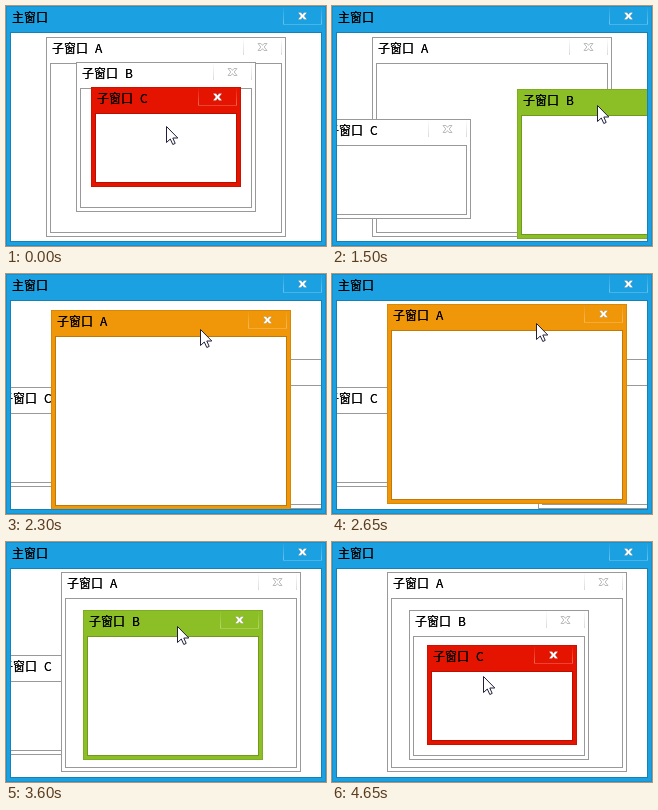
Write an HTML page with a canvas that moves like this. It is 320 px wide and 240 px high and loops after 4700 ms.

```html
<!DOCTYPE html>
<html lang="zh">
<head>
<meta charset="utf-8">
<style>
html, body { margin: 0; width: 100%; height: 100%; overflow: hidden; background: #fff; }
canvas { display: block; }
</style>
</head>
<body>
<canvas id="stage" width="320" height="240"></canvas>
<script>
const ctx = document.getElementById('stage').getContext('2d');
const LOOP = 4700, STEP = 50, SAG = 6;
const pointerStart = [160, 120], pointerEnd = [151, 134];

const windows = {
  A: { home: [40, 31], w: 240, h: 200, color: '#f09609' },
  B: { home: [70, 56], w: 180, h: 150, color: '#8cbf26' },
  C: { home: [85, 81], w: 150, h: 100, color: '#e51400' }
};

// Each drag raises its window and carries it, held at the grab point, to its goal
const drags = [
  { name: 'C', start: 650, end: 1050, grab: [74, 16], goal: [-11, 113] },
  { name: 'B', start: 1200, end: 1600, grab: [80, 16], goal: [206, 85] },
  { name: 'A', start: 2100, end: 2650, grab: [149, 19], goal: [55, 30] },
  { name: 'B', start: 3400, end: 3600, grab: [94, 16], goal: [77, 68] },
  { name: 'C', start: 4100, end: 4250, grab: [36, 16], goal: [95, 103] }
];

function ease(start, end, t) {
  const u = Math.min(Math.max((t - start) / (end - start), 0), 1);
  return u * u * (3 - 2 * u);
}

const add = (a, b) => [a[0] + b[0], a[1] + b[1]];
const mix = (a, b, k) => a.map((v, i) => Math.round(v + (b[i] - v) * k));

function sceneAt(t) {
  const places = {};
  for (const name in windows) places[name] = windows[name].home;
  let order = 'ABC', pointer = pointerStart, free = 500, losingFocus = '';
  for (const { name, start, end, grab, goal } of drags) {
    const glide = ease(Math.max(free, start - 600), start - 100, t);
    pointer = mix(pointer, add(places[name], grab), glide);
    if (t < start) break;
    // The window that loses focus gets its border one step late
    losingFocus = t < start + STEP ? order.at(-1) : '';
    order = order.replace(name, '') + name;
    const k = ease(start, end, t);
    const sag = Math.round(SAG * Math.sin(Math.PI * k));
    places[name] = add(mix(places[name], goal, k), [0, sag]);
    pointer = add(places[name], grab);
    free = end;
  }
  pointer = mix(pointer, pointerEnd, ease(LOOP - 2 * STEP, LOOP - STEP, t));
  return { places, order, pointer, losingFocus };
}

function fill(color, x, y, w, h) {
  ctx.fillStyle = color;
  ctx.fillRect(x, y, w, h);
}

function outline(color, x, y, w, h) {
  ctx.strokeStyle = color;
  ctx.lineWidth = 1;
  ctx.strokeRect(x + .5, y + .5, w - 1, h - 1);
}

function drawShape(path, x, y, stroke) {
  ctx.save();
  ctx.translate(x, y);
  ctx.fillStyle = '#fff';
  ctx.fill(path);
  ctx.strokeStyle = stroke;
  ctx.lineWidth = 1;
  ctx.stroke(path);
  ctx.restore();
}

const cross = new Path2D('M-4.5-3.5h3L0-1.6 1.5-3.5h3L1.7 0 4.5 3.5h-3L0 1.6-1.5 3.5h-3L-1.7 0Z');
const arrow = new Path2D('M.5 .5V16.5L4.3 13L6.8 18.5L9.2 17.4L6.8 12H11.8Z');

function closeButton(x, y, active) {
  const tone = active ? '255,255,255' : '150,150,150';
  const fade = ctx.createLinearGradient(0, y, 0, y + 18);
  fade.addColorStop(0, `rgba(${tone},0)`);
  fade.addColorStop(1, `rgba(${tone},.35)`);
  fill(fade, x, y + 1, 1, 17);
  fill(fade, x + 38, y + 1, 1, 17);
  if (active) fill(`rgba(${tone},.2)`, x, y + 18, 39, 1);
  drawShape(cross, x + 19.5, y + 10, active ? 'rgba(0,0,0,.12)' : '#bbb');
}

function drawWindow([x, y], { w, h, color }, title, letter, active, bordered = true) {
  fill(active ? color : '#fff', x, y, w, h);
  if (bordered) outline(active ? 'rgba(0,0,0,.1)' : '#999', x, y, w, h);
  fill('#fff', x + 5, y + 27, w - 10, h - 32);
  outline(active ? 'rgba(0,0,0,.2)' : '#999', x + 4, y + 26, w - 8, h - 30);
  closeButton(x + w - 43, y, active);
  ctx.fillStyle = '#000';
  ctx.font = '12px "Noto Sans CJK SC", "Noto Sans CJK", sans-serif';
  // Two passes give the crisp, dark look of hinted text
  for (let pass = 0; pass < 2; pass++) {
    ctx.fillText(title, x + 6, y + 16);
    ctx.fillText(letter, x + 49, y + 16);
  }
}

function draw(t) {
  const { places, order, pointer, losingFocus } = sceneAt(t);
  drawWindow([0, 0], { w: 320, h: 240, color: '#1ba1e2' }, '主窗口', '', true);
  ctx.save();
  ctx.beginPath();
  ctx.rect(5, 27, 310, 208);
  ctx.clip();
  for (const name of order) {
    drawWindow(places[name], windows[name], '子窗口', name, order.endsWith(name), name !== losingFocus);
  }
  ctx.restore();
  drawShape(arrow, ...pointer, '#20203c');
}

const begin = performance.now();
function tick() {
  const t = (performance.now() - begin) % LOOP;
  draw(Math.floor(t / STEP) * STEP);
  requestAnimationFrame(tick);
}
tick();
</script>
</body>
</html>
```
